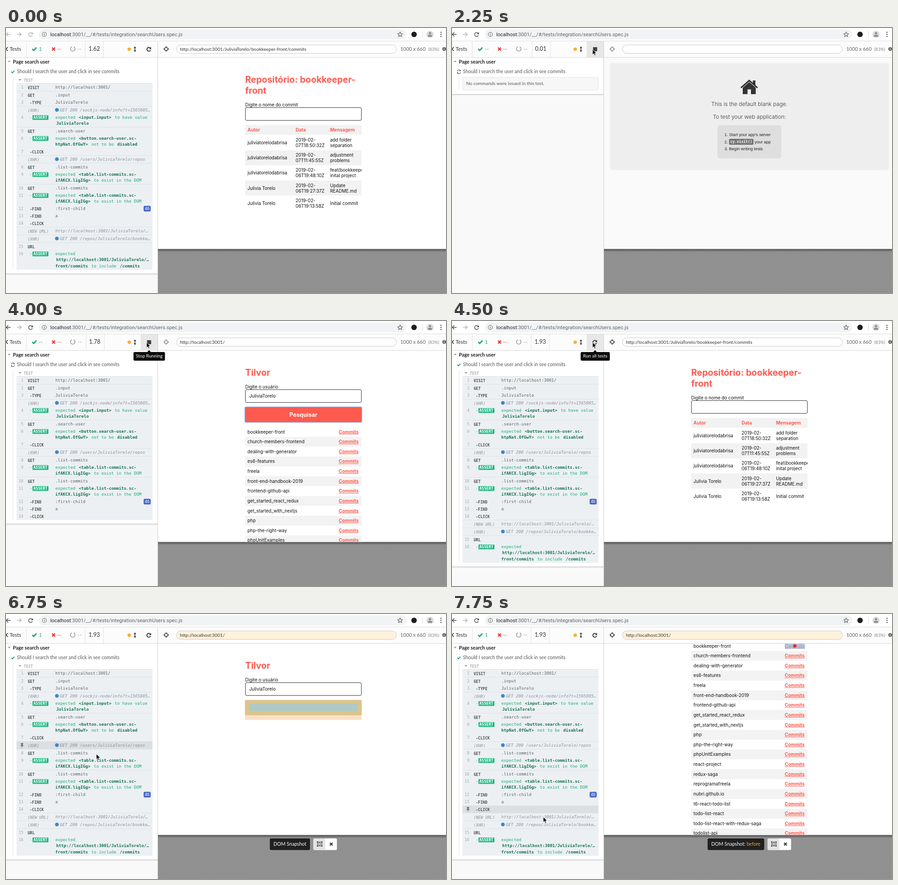
Animation, 964 px wide and 581 px high, one loop 8000 ms. Source, as an HTML page:

```html
<!DOCTYPE html>
<html lang="pt">
<head>
<meta charset="utf-8">
<title>Test runner</title>
<style>
  html, body { margin: 0; width: 100%; height: 100%; overflow: hidden; }
  svg { display: block; }
  text { white-space: pre; }
  .lato { font-family: Lato, sans-serif; }
  .mono { font-family: "DejaVu Sans Mono", monospace; }
  .inter { font-family: Inter, sans-serif; }
  .arial { font-family: "Liberation Sans", Arial, sans-serif; }
  .roboto { font-family: Roboto, sans-serif; }
</style>
</head>
<body>
<svg id="stage" width="964" height="581" viewBox="0 0 964 581"></svg>
<script>
const STEP = 250, LOOP = 8000;
const USER = 'JuliviaTorelo', HOME = 'http://localhost:3001/';
const RED = '#ff5a50', GREEN = '#1fa971', DARK_GREEN = '#13724a', BLUE = '#3f87c6';
const BOLD = 'font-weight="700"', MIDDLE = 'text-anchor="middle"', END = 'text-anchor="end"';

// Command log: [label, lines, options]; *...* is bold, a leading ^ continues bold
const tableAssert = ['-ASSERT', ['expected *<table.list-commits.sc-*', '^ifAKCX.ligIGg>* to exist in the DOM'],
  { waiting: ['expected *.list-commits* to exist in', 'the DOM'] }];
const COMMANDS = [
  ['VISIT', [HOME]],
  ['GET', ['.input']],
  ['-TYPE', [USER]],
  ['(XHR)', ['GET 200 /sockjs-node/info?t=1565805…']],
  ['-ASSERT', ['expected *<input.input>* to have value', `*${USER}*`]],
  ['GET', ['.search-user']],
  ['-ASSERT', ['expected *<button.search-user.sc-*', '^htpNat.OfGwY>* not to be *disabled*']],
  ['-CLICK', ['']],
  ['(XHR)', [`GET 200 /users/${USER}/repos`], { waiting: [`GET --- /users/${USER}/repos`] }],
  ['GET', ['.list-commits']],
  tableAssert,
  ['GET', ['.list-commits']],
  tableAssert,
  ['-FIND', [':first-child'], { badge: 46 }],
  ['-FIND', ['a']],
  ['-CLICK', ['']],
  ['(NEW URL)', [`${HOME}${USER}/…`]],
  ['(XHR)', [`GET 200 /repos/${USER}/bookke…`]],
  ['URL', ['']],
  ['-ASSERT', ['expected', `*${HOME}${USER}/…*`, '^front/commits* to include */commits*']],
];
const COMMITS = [
  ['juliviatorelodabrisa', '07T18:50:32Z', 'add folder', 'separation'],
  ['juliviatorelodabrisa', '07T11:45:55Z', 'adjustment', 'problems'],
  ['juliviatorelodabrisa', '06T19:48:10Z', 'feat(bookkeeper)', 'inital project'],
  ['Julivia Torelo', '06T19:27:37Z', 'Update', 'README.md'],
  ['Julivia Torelo', '06T19:13:58Z', 'Initial commit'],
];
const REPOS = ('bookkeeper-front church-members-frontend dealing-with-generator es6-features freela ' +
  'front-end-handbook-2019 frontend-github-api get_started_react_redux get_started_with_nextjs php ' +
  'php-the-right-way phpUnitExamples react-project redux-saga reprogramafreela nubri.github.io ' +
  't6-react-todo-list todo-list-react todo-list-react-with-redux-saga todolist-api').split(' ');

// step: [finished commands, waiting commands]
const PROGRESS = { 8: [0, 0], 9: [0, 0], 10: [0, 1], 11: [2, 1], 12: [6, 1], 13: [8, 3], 14: [8, 3], 15: [8, 3], 16: [16, 0] };
const PINS = { 22: 4, 23: 4, 24: 4, 25: 6, 26: 6, 27: 8, 28: 10, 29: 12, 30: 14, 31: 15 };
const CURSOR = { 2: [447, 286], 3: [402, 195], 4: [345, 95], 5: [312, 54], 6: [308, 47], 21: [262, 118],
  22: [213, 178], 23: [206, 190], 25: [203, 258], 27: [198, 307], 28: [198, 338], 29: [199, 374], 30: [200, 410], 31: [200, 445] };

const esc = s => String(s).replace(/&/g, '&amp;').replace(/</g, '&lt;');
const text = (x, y, s, size, fill = '#333', more = '') =>
  `<text x="${x}" y="${y}" font-size="${size}" fill="${fill}" ${more}>${esc(s)}</text>`;
const rect = (x, y, w, h, fill, r = 0, more = '') =>
  `<rect x="${x}" y="${y}" width="${w}" height="${h}" fill="${fill}" rx="${r}" ${more}/>`;
const dot = (x, y, r, fill, more = '') => `<circle cx="${x}" cy="${y}" r="${r}" fill="${fill}" ${more}/>`;
const line = (d, color, w = 1, more = '') => `<path d="${d}" fill="none" stroke="${color}" stroke-width="${w}" ${more}/>`;
const shape = (d, fill) => `<path d="${d}" fill="${fill}"/>`;
const group = (cls, ...parts) => `<g class="${cls}">${parts.join('')}</g>`;
const clip = (x, y, w, h, body) =>
  `<svg x="${x}" y="${y}" width="${w}" height="${h}" viewBox="${x} ${y} ${w} ${h}">${body}</svg>`;
const reload = (x, y, r, color, w) =>
  line(`M${x + r * .75} ${y - r * .6}A${r} ${r} 0 1 0 ${x + r * .9} ${y + r * .45}`, color, w) +
  shape(`M${x + r + .8} ${y - r - .5}v${r + .3}h${-r - .3}z`, color);
const check = (x, y, s) => line(`M${x - 4.5 * s} ${y}l${3.2 * s} ${3.2 * s} ${6 * s} ${-6.5 * s}`, GREEN, 2.8 * s);

function browserBar(active) {
  const ink = active ? '#4a4d51' : '#b4b6b8';
  return rect(0, 0, 964, 28, '#fff') + rect(72, 3, 805, 22, '#f1f3f4', 11) +
    line('M10 14H1M5 9.5L.5 14 5 18.5', ink, 1.5) + line('M24 14h9M29 9.5l4.5 4.5-4.5 4.5', '#b4b6b8', 1.5) +
    reload(54, 14, 4.3, ink, 1.5) +
    dot(84, 14, 4.7, 'none', 'stroke="#5f6368"') + line('M84 13.3v3.2M84 11v1.2', '#5f6368', 1.2) +
    `<text class="roboto" x="97" y="18" font-size="11.1" fill="#5f6368"><tspan fill="#202124">localhost</tspan>:3001/__/#/tests/integration/searchUsers.spec.js</text>` +
    line('M863.5 8.8l1.5 3.5 3.8.3-2.9 2.5.9 3.7-3.3-2-3.3 2 .9-3.7-2.9-2.5 3.8-.3z', '#5f6368', 1.2) +
    dot(894, 14, 6, '#1d1d1f') + line('M912.5 7v14', '#d5d5d5') +
    dot(929, 14, 7.8, '#d6d8da') + dot(929, 11.5, 2.4, '#85898d') + shape('M924 19q0-4 5-4t5 4z', '#85898d') +
    [9.5, 14, 18.5].map(y => dot(953, y, 1.3, '#4a4d51')).join('') + line('M0 28.5H964', '#dcdcdc');
}

function header(s) {
  const shift = s.running ? 2 : 0;
  return group('lato',
    rect(0, 29, 964, 36, '#fcfcfc'),
    s.hover ? rect(295, 29, 37, 35, '#e7e7e7') : '',
    line('M4 42L0 46l4 4', '#333', 1.6), text(8, 50, 'Tests', 11.4),
    line(`M44.5 29v35M${173.5 + shift} 29v35M${213.5 + shift} 29v35`, '#e2e2e2'),
    check(62, 46, 1), text(72, 50, s.running ? '--' : '1', 11.6, GREEN),
    line('M101 43l6.4 6.4M107.4 43l-6.4 6.4', '#e5403a', 2.6), text(112, 50, '--', 11.6, '#e5403a'),
    line('M144 41.3a5 5 0 1 0 4.5 0', '#999', 1.6), text(157, 50, '--', 11.6, '#999'),
    text(181 + shift / 2, 50, s.timer, 12.6),
    dot(270, 46.5, 3.8, '#fbb034'),
    line('M282.5 43v7', '#333', 1.5), shape('M279.7 44l2.8-3.5 2.8 3.5zM279.7 49l2.8 3.5 2.8-3.5z', '#333'),
    s.running ? rect(309, 42, 9, 9, '#404040') : reload(313, 46.5, 4.2, '#333', 1.9),
    dot(351, 46, 3.8, 'none', `stroke="${s.running ? '#888' : '#333'}" stroke-width="1.3"`),
    line('M351 40v4M351 48v4M345 46h4M353 46h4', s.running ? '#888' : '#333', 1.3),
    rect(373.5, 37, 482, 18.5, s.pin === undefined ? '#fff' : '#fff2dc', 9.2, 'stroke="#c9c9c9"'),
    text(381, 49.5, s.url, 10.2),
    text(864, 49.5, '1000 x 660', 10.9, '#666'), text(925, 49.5, '(83%)', 9.6, '#888'),
    dot(960, 46, 4.2, '#666'), line('M960 45.4v3M960 43v1.2', '#fff', 1.3),
    line('M0 64.5H964', '#d8d8d8'));
}

function richLine(x, y, source, color, strong) {
  const offset = source[0] === '^' ? 1 : 0;
  const spans = source.slice(offset).split('*').map((part, i) => part &&
    `<tspan dx="${i ? 2 : 0}" ${(i + offset) % 2 ? `${BOLD} fill="${strong}"` : ''}>${esc(part)}</tspan>`);
  return `<text x="${x}" y="${y}" font-size="9.13" fill="${color}">${spans.join('')}</text>`;
}

const ring = (x, y) => dot(x, y, 3.8, 'none', `stroke="${BLUE}" stroke-width="1.5" stroke-dasharray="1.2 1.8"`);

function command([label, lines, options = {}], top, number, waiting, pinned) {
  const event = label[0] === '(', child = label[0] === '-', assert = label === '-ASSERT';
  if (waiting) lines = options.waiting || lines;
  const y = child ? top : top + 1;   // parents have a border above
  const height = 16 + Math.floor(13.5 * (lines.length - 1));
  const italic = event ? 'font-style="italic"' : '';
  const ink = waiting ? '#7ca6cc' : assert ? GREEN : '#5b6066';
  const out = [rect(23, y, 298, height, pinned ? '#dcdfe1' : waiting ? '#e0edf8' : '#ecf0f3')];
  if (!child) out.push(rect(23, top, 298, 1, waiting ? '#cfe0ee' : '#dce3e8'));
  if (waiting) out.push(rect(23, top, 1.5, y + height - top, BLUE), ring(35, y + 8));
  else if (pinned) out.push(shape(`M32 ${y + 3}h6v1.3h-1v3l2 2.4h-8l2-2.4v-3h-1zM34.4 ${y + 9.5}h1.2v4h-1.2z`, '#777'));
  else if (!event) out.push(text(38, y + 11, number, 8.5, '#a3a8ad', END));
  if (assert) out.push(text(52, y + 11.4, '-', 8.5, ink), rect(58, y + 3, 35, 10.5, waiting ? BLUE : '#1fb980', 1.5),
    text(60, y + 11.4, 'ASSERT', 8.5, '#fff', BOLD));
  else out.push(text(child ? 52 : 47.5, y + 11.5, label, 8.5, event ? '#8b9097' : waiting ? '#7ca6cc' : '#4c5156', event ? italic : BOLD));
  if (label === '(XHR)') out.push(dot(111.5, y + 7.5, 4, waiting ? '#a5a9ad' : BLUE));
  const x = label === '(XHR)' ? 118 : 108;
  lines.forEach((source, i) => {
    const base = y + 10.8 + 13.5 * i;
    out.push(event ? text(x, base, source, 9.13, '#8b8f9c', italic)
      : richLine(x, base, source, ink, waiting ? '#2c5f92' : DARK_GREEN));
  });
  if (options.badge) out.push(rect(301.5, y + 1.7, 15.5, 12.6, '#4868c4', 3), text(309.3, y + 11, options.badge, 8.5, '#fff', MIDDLE));
  return [out.join(''), y + height];
}

function reporter(s) {
  const [done, waiting] = s.progress;
  let y = 121, number = 0, log = '';
  COMMANDS.slice(0, done + waiting).forEach((entry, i) => {
    if (entry[0][0] !== '(') number++;
    const [markup, bottom] = command(entry, y, number, i >= done, i === s.pin);
    log += markup;
    y = bottom;
  });
  if (!log) y = 136.5;
  const loading = s.step === 8;
  const end = y + 8.5;
  const body = loading ? text(166, 110, 'Your tests are loading...', 10.6, '#777', MIDDLE) :
    rect(0, 65, 332, end - 65, '#fff') + rect(0, end, 332, 1.2, '#bdbdbd') + rect(0, end + 1.2, 332, 1.5, '#e9e9e9') +
    shape('M4 72h6l-3 3.5z', '#999') + text(15, 77.7, 'Page search user', 10.8, '#222', BOLD) +
    (s.running ? line('M11.5 95a3.6 3.6 0 0 1 6.6-1.5M18.7 97a3.6 3.6 0 0 1-6.6 1.5', '#555', 1.2) +
      shape('M19 91.5v3.2h-3.2zM11 100.5v-3.2h3.2z', '#555') : check(15, 96, .7)) +
    text(24, 99.3, 'Should I search the user and click in see commits', 10.55, '#555') +
    line(`M15.5 107V${y}`, '#e4e4e4') +
    (log ? shape('M27.5 112h6l-3 4z', '#999') + text(39, 117.5, 'TEST', 8.6, '#8c8c8c')
      : rect(23.5, 108, 297, 28, '#f7f7f7', 2, 'stroke="#e4e4e4"') + text(31, 124.6, 'No commands were issued in this test.', 10.2, '#555'));
  return rect(0, 65, 332, 516, '#f9f9f9') + group('lato', body) + group('mono', log);
}

const input = (y, value = '') =>
  rect(524.5, y + .5, 254, 28, '#fff', 2.5, 'stroke="#333"') + text(533, y + 18, value, 9.8, '#111');

// Box-model overlay: padding, content and bottom margin
const boxModel = (y, h, padding) => rect(523.8, y, 255.4, h, padding) + rect(533, y + 8, 237, h - 16.5, '#b0c9c5') +
  rect(523.8, y + h, 255.4, 10.5, '#fbe0c5');

function formPage(s, value = USER) {
  const live = s.pin === undefined;
  let out = text(524, 120, 'Tilvor', 19.5, RED, BOLD) + text(524, 147.5, 'Digite o usuário', 9.8, '#111') + input(150, value);
  if (live && s.step > 11) out += rect(522.5, 187.5, 258, 35.5, '#8fc2f3', 4);
  out += rect(523.8, 188.7, 255.4, 33.1, RED, 2.5) + text(651.5, 210.2, 'Pesquisar', 12.6, '#fff', `${BOLD} ${MIDDLE}`);
  if (s.pin === 4) out += boxModel(149.7, 28.9, '#d8d08f');
  if (s.pin === 6 || s.pin === 8) out += boxModel(188.7, 33.1, '#d9c58b');
  if (live && s.step > 12 && s.step < 16)
    out += line('M659 258l4-4', '#e04a50', 1.4, `transform="rotate(${(s.step - 13) * 90} 652 265)"`);
  return out;
}

function commitsPage() {
  const heads = [[529, 'Autor'], [634.5, 'Data'], [710, 'Mensagem']];
  return text(524, 120, 'Repositório: bookkeeper-', 19.5, RED, BOLD) + text(524, 144, 'front', 19.5, RED, BOLD) +
    text(524, 171.5, 'Digite o nome do commit', 9.8, '#111') + input(174) + rect(524, 212.5, 255, 21.5, '#f2f2f2') +
    heads.map(([x, s]) => text(x, 227.4, s, 10, RED, BOLD)).join('') +
    COMMITS.map(([author, time, first, second], i) => {
      const mid = 251.2 + 33.2 * i;
      return (i % 2 ? rect(524, mid - 16.6, 255, 33.2, '#f2f2f2') : '') + text(529, mid + 3.8, author, 9.8, '#111') +
        text(634.5, mid - 2.2, '2019-02-', 9.8, '#111') + text(634.5, mid + 9.8, time, 9.8, '#111') +
        clip(705, mid - 16, 74, 32, second ? text(710, mid - 2.2, first, 9.8, '#111') + text(710, mid + 9.8, second, 9.8, '#111')
          : text(710, mid + 3.8, first, 9.8, '#111'));
    }).join('');
}

function listPage(s) {
  const scrolled = s.step >= 30, top = scrolled ? 70 : 243;
  let out = scrolled ? '' : formPage(s);
  REPOS.forEach((name, i) => {
    const y = top + 21.63 * i;
    if (i % 2) out += rect(524, y - 10.8, 255, 21.6, '#f3f3f3');
    out += text(529, y + 3.5, name, 9.9, '#111') + text(729, y + 3.5, 'Commits', 10, RED, `${BOLD} text-decoration="underline"`);
  });
  if (scrolled) out += rect(729, 64, 44.5, 12.5, '#9db8d8', 0, 'opacity=".7"');
  else if (s.pin !== undefined) out += rect(524, 232, 255, 460, '#9fc4e7', 0, 'opacity=".65"');
  if (s.step === 31) out += dot(751, 70, 4, '#e8403c') + dot(751, 70, 1.6, '#b51f1f');
  return out;
}

function blankPage() {
  const item = (y, n, s, x = 607) => text(597, y, n + '.', 9.1, '#222') + text(x, y, s, 9.1, '#222');
  return rect(333, 65, 631, 419, '#fafafa') + rect(346, 77, 611, 234, '#eee', 3) +
    shape('M632 130l19.2-17 8 7v-5h5.5v10l5.5 5-2 2.2-17-15-17 15zM637 131l14.2-12.5L665.5 131v14h-10.5v-10.5h-7.5V145H637z', '#333') +
    group('inter', text(651.5, 171, 'This is the default blank page.', 12, '#333', `font-weight="300" ${MIDDLE}`),
      text(651.5, 199, 'To test your web application:', 12, '#333', `font-weight="300" ${MIDDLE}`)) +
    rect(581.5, 213, 140, 73, '#dedede', 6) +
    group('arial', item(237.3, 1, "Start your app's server"), item(252.5, 2, 'your app', 663), item(267.7, 3, 'Begin writing tests')) +
    rect(607, 243, 53.5, 13, '#757575', 2) + group('mono', text(609.6, 252.3, 'cy.visit()', 8, '#fff', BOLD));
}

function snapshotBar(s) {
  const before = s.step === 31, x = before ? 560 : 578, w = before ? 124 : 88, b = x + w + 7.5;
  return group('lato', rect(x, 492, w, 25.5, '#202020', 3),
    `<text x="${x + 8}" y="508.3" font-size="10.6" fill="#fff">DOM Snapshot${before ? ': <tspan fill="#f5a13a">before</tspan>' : ''}</text>`,
    rect(b, 492, 51.5, 25.5, '#fff', 3), rect(b, 492, 26, 25.5, '#e4e4e4', 3),
    rect(b + 9, 500, 9.5, 8.5, 'none', 0, 'stroke="#444" stroke-width="1.2"'),
    dot(b + 13.7, 504.2, 2.5, 'none', 'stroke="#444"'),
    [[8, 499], [18, 499], [8, 508], [18, 508]].map(([dx, y]) => rect(b + dx - .5, y - .5, 2.4, 2.4, '#444')).join(''),
    line(`M${b + 36} 501.5l6 6m0-6l-6 6`, '#333', 2.2));
}

function viewport(s) {
  const page = { blank: blankPage, form: () => formPage(s, s.step === 11 ? USER.slice(0, 5) : USER),
    list: () => listPage(s), commits: commitsPage }[s.page]();
  return `<defs><pattern id="hatch" width="4" height="4" patternUnits="userSpaceOnUse" patternTransform="rotate(-45)">
    <path d="M0 0h4v4H0z" fill="#959595"/><path d="M0 0h4v2H0z" fill="#8c8c8c"/></pattern>
    <linearGradient id="shade" x2="0" y2="1"><stop stop-opacity=".5"/><stop offset="1" stop-opacity="0"/></linearGradient></defs>` +
    rect(333, 484, 631, 97, 'url(#hatch)') + rect(333, 484, 631, 7, 'url(#shade)') +
    rect(333, 65, 631, 419.5, '#fff') + clip(333, 65, 631, 419.5, group('inter', page)) +
    (s.pin === undefined ? '' : snapshotBar(s)) + line('M332.5 29V581', '#cfcfcf');
}

function tooltip(label) {
  const w = label === 'Stop Running' ? 69 : 64;
  return rect(313.8 - w / 2, 68, w, 19, '#0d0d0d', 3) + shape('M309 68.5l4.5-4.5 4.5 4.5z', '#0d0d0d') +
    group('lato', text(313.8, 80.4, label, 10, '#fff', MIDDLE));
}

function cursor(step) {
  while (step > 1 && !CURSOR[step]) step--;
  if (step < 2) return '';
  const [x, y] = CURSOR[step];
  return `<path d="M${x} ${y}v11.5l2.7-2.5 1.9 4.4 2-.9-1.9-4.2h3.7z" fill="#000" stroke="#fff" stroke-width=".8"/>`;
}

function scene(step) {
  const running = step >= 8 && step < 17;
  const page = step < 8 ? 'commits' : step < 11 ? 'blank' : step < 16 ? 'form' : step < 17 ? 'list'
    : step < 22 ? 'commits' : step < 28 ? 'form' : 'list';
  const s = {
    step, running, page, pin: PINS[step],
    hover: step >= 5 && step < 21,
    progress: PROGRESS[step] || [COMMANDS.length, 0],
    timer: step < 8 ? '1.62' : step < 9 ? '--' : running ? (.01 + .2525 * (step - 9)).toFixed(2) : '1.93',
    url: { blank: '', commits: `${HOME}${USER}/bookkeeper-front/commits` }[page] ?? HOME,
  };
  const tip = step === 6 || (step >= 18 && step < 21) ? 'Run all tests' : step >= 10 && step < 17 ? 'Stop Running' : '';
  return browserBar(step > 1) + header(s) + reporter(s) + viewport(s) + (tip && tooltip(tip)) + cursor(step);
}

const stage = document.getElementById('stage');
let shown = -1;
function draw() {
  const step = Math.floor(performance.now() % LOOP / STEP);
  if (step !== shown) stage.innerHTML = scene(shown = step);
  requestAnimationFrame(draw);
}
draw();
</script>
</body>
</html>
```
